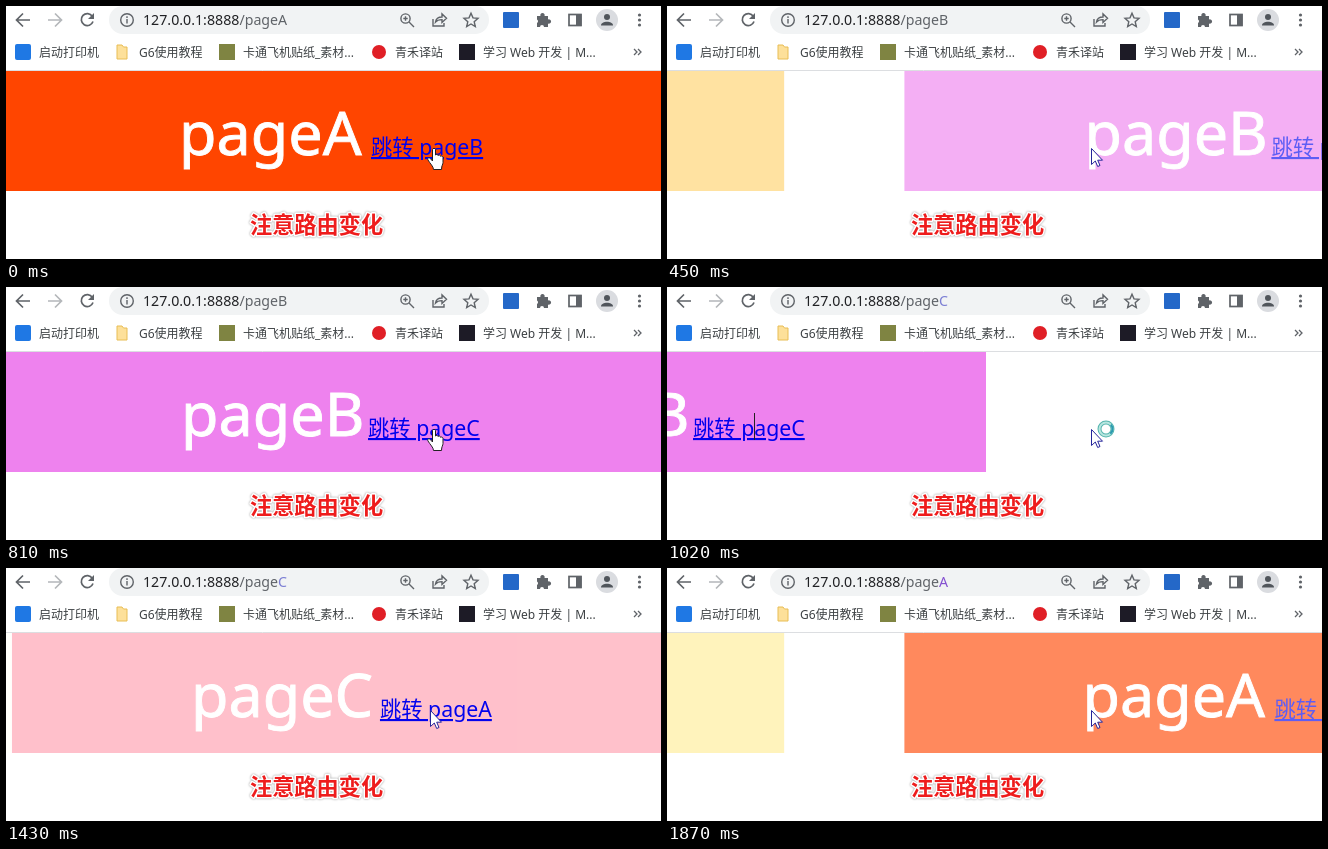
Recreate the animation shown at these times as an HTML page. Size 655 px wide and 253 px high, loop 1910 ms.

```html
<!DOCTYPE html>
<html lang="zh">
<head>
<meta charset="utf-8">
<title>Page transitions</title>
<style>
  html, body { margin: 0; width: 100%; height: 100%; overflow: hidden; background: #fff; }
  svg { display: block; font-family: "Noto Sans", "Noto Sans CJK SC", sans-serif; }
  .bar { font-size: 12px; fill: #3c4043; }
  .icon { fill: none; stroke: #5f6368; stroke-width: 1.7; }
  .title { font-size: 61px; fill: #fff; stroke: #fff; stroke-width: .9px; }
  .link { font-size: 21.3px; fill: #00e; text-decoration: underline; }
  .note { font: bold 22.2px "Noto Sans CJK SC", "Noto Sans CJK", sans-serif; fill: #ee1c1c;
    stroke: #fff; stroke-width: 3px; paint-order: stroke; stroke-linejoin: round;
    filter: drop-shadow(0 0 1px #999); }
</style>
</head>
<body>
<svg width="655" height="253" viewBox="0 0 655 253">
  <rect width="655" height="253" fill="#fff"/>
  <rect x="103" y="0" width="380" height="28" rx="14" fill="#f1f3f4"/>

  <!-- toolbar -->
  <g class="icon">
    <path d="M24 14H11M17 7.500L10.500 14L17 20.500"/>
    <path d="M42 14H55M49 7.500L55.500 14L49 20.500" stroke="#b4b7ba"/>
    <path d="M86.300 10.200A6 6 0 1 0 87 15.500"/>
    <path d="M88 7V13H82Z" fill="#5f6368" stroke="none"/>
    <g stroke-width="1.4">
      <circle cx="121" cy="14" r="6.300"/>
      <path d="M121 13V17.500M121 10.300V11.900"/>
      <circle cx="399.500" cy="12.500" r="4.600"/>
      <path d="M403 16L408 21M397.300 12.500H401.700M399.500 10.300V14.700"/>
      <path d="M427 13V20H438V17M429.500 16C430 12.500 432.500 11 436 11V8L440.500 12.300L436 16.500V13.600C433 13.600 431 14.200 429.500 16Z"/>
      <path d="M465 7.300L467 11.900L472 12.400L468.200 15.700L469.300 20.500L465 18L460.700 20.500L461.800 15.700L458 12.400L463 11.900Z"/>
    </g>
    <rect x="563" y="8.500" width="12" height="11"/>
  </g>
  <rect x="570" y="8" width="5.500" height="12" fill="#5f6368"/>
  <rect x="497" y="6" width="16" height="16" rx="1" fill="#2468c8"/>
  <path d="M531 10H534.500A2.200 2.200 0 1 1 538.500 10H542V13.500A2.200 2.200 0 1 1 542 17.500V21H538A2 2 0 0 0 534 21H531V17A2 2 0 0 0 531 13.500Z" fill="#5f6368"/>
  <circle cx="601" cy="14" r="11" fill="#dadce0"/>
  <circle cx="601" cy="11" r="3" fill="#50555b"/>
  <path d="M595 19.500C595 14.500 607 14.500 607 19.500Z" fill="#50555b"/>
  <g fill="#5f6368">
    <circle cx="633.500" cy="9" r="1.600"/><circle cx="633.500" cy="14" r="1.600"/><circle cx="633.500" cy="19" r="1.600"/>
  </g>
  <text x="137" y="18.500" font-size="14.200" fill="#202124">127.0.0.1:8888<tspan fill="#5f6368">/page</tspan><tspan id="route">A</tspan></text>

  <!-- bookmarks -->
  <rect x="9" y="38" width="16" height="16" rx="2" fill="#1f78e4"/>
  <path d="M111 39H116L117.500 41H121V53H111Z" fill="#fde09a" stroke="#e8bd55"/>
  <rect x="213" y="38" width="16" height="16" fill="#7f8442"/>
  <circle cx="373" cy="46" r="7" fill="#e01f26"/>
  <rect x="453" y="38" width="16" height="16" fill="#1d1b26"/>
  <g class="bar">
    <text x="33" y="51">启动打印机</text>
    <text x="133" y="51">G6使用教程</text>
    <text x="237" y="51">卡通飞机贴纸_素材...</text>
    <text x="389" y="51">青禾译站</text>
    <text x="477" y="51">学习 Web 开发 | M...</text>
  </g>
  <path class="icon" d="M628 43L631 46L628 49M632 43L635 46L632 49" style="stroke-width:1.300"/>
  <path d="M0 64.500H655" stroke="#dcdee1"/>

  <g id="pages"></g>
  <text class="note" x="244" y="226.500">注意路由变化</text>

  <!-- pointer -->
  <path id="arrow" d="M424.500 142.500V158.500L428.300 155L430.700 160.500L433 159.500L430.700 154.200H435.500Z" fill="#fff" stroke="#25259a"/>
  <path id="hand" d="M426.500 143.500C426.500 142 429.500 142 429.500 143.500V149C430 148 432 148.300 432 149.500C433 148.600 434.500 149 434.500 150.300C435.500 149.600 437 150.300 437 151.500V156.500C437 158.500 435.500 159.500 435.500 163.500H427.500C427.500 160.500 424 157.500 422 154C421 152 423 151 424.300 152.500L426.500 155Z" fill="#fff" stroke="#222"/>
  <g id="busy" fill="none">
    <circle cx="439" cy="142" r="6.500" stroke="#55b5ae" stroke-width="4"/>
    <circle cx="439" cy="142" r="6.500" stroke="#b8e6e0" stroke-width="2"/>
    <path id="spin" d="M439 135.500A6.500 6.500 0 0 1 445.500 142" stroke="#2b9ab0" stroke-width="2"/>
  </g>
</svg>
<script>
const LOOP = 1910, WIDTH = 660, REST = -5, HALF = 319;
const SLIDE = 485, WAIT = 24;
const YELLOW = [255, 240, 0];
const $ = id => document.getElementById(id);

const pages = [
  { name: "A", next: "B", color: [255, 69, 0], titleX: 178, linkX: 370 },
  { name: "B", next: "C", color: [238, 130, 238], titleX: 180, linkX: 367 },
  { name: "C", next: "A", color: [255, 192, 203], titleX: 179, linkX: 368 }
];
// start of each slide, and the colour of the route's last letter after it
const moves = [
  { start: 273, ink: "#5f6368" },
  { start: 1027, ink: "#7c7fd4" },
  { start: 1693, ink: "#8450d0" }
];

$("pages").innerHTML = pages.map(p => `<g>
  <rect y="65" width="${WIDTH}" height="120"/>
  <text class="title" x="${p.titleX}" y="149">page${p.name}</text>
  <text class="link" x="${p.linkX}" y="149">跳转 page${p.next}</text>
  <path d="M428.500 126V153" stroke="#222"/></g>`).join("");
const groups = [...$("pages").children];

// CSS "ease": cubic-bezier(.25, .1, .25, 1)
function ease(x) {
  if (x <= 0) return 0;
  if (x >= 1) return 1;
  const curve = (a, b, u) => 3 * a * u * (1 - u) ** 2 + 3 * b * u * u * (1 - u) + u ** 3;
  let lo = 0, hi = 1;
  for (let i = 0; i < 24; i++) {
    const mid = (lo + hi) / 2;
    if (curve(.25, .25, mid) < x) lo = mid; else hi = mid;
  }
  return curve(.1, 1, lo);
}

const mix = (a, b, p) => `rgb(${a.map((v, i) => Math.round(v + (b[i] - v) * p))})`;
const show = (el, on) => { el.style.display = on ? "" : "none"; };

function place(i, x, opacity, fill, caret) {
  const g = groups[i];
  show(g, opacity > 0);
  g.setAttribute("transform", `translate(${x} 0)`);
  g.setAttribute("opacity", opacity);
  g.children[0].setAttribute("fill", fill);
  show(g.children[3], caret);
}

function draw(t) {
  const done = moves.filter(m => t >= m.start - WAIT).length;
  const now = done % 3, old = done - 1;
  const move = moves[old];
  const age = move ? t - move.start : Infinity;
  const p = ease(age / SLIDE);

  pages.forEach((page, i) => {
    if (i === now) place(i, REST + WIDTH * (1 - p), p, mix(page.color, page.color, 0), false);
    else if (i === old) place(i, HALF * (1 - p) - WIDTH, 1 - p, mix(page.color, YELLOW, p), p < .05);
    else show(groups[i], false);
  });

  $("route").textContent = pages[now].name;
  $("route").setAttribute("fill", move ? move.ink : "#5f6368");

  const hand = age > SLIDE + 40;
  show($("hand"), hand);
  show($("arrow"), !hand);
  show($("busy"), age < 60);
  $("spin").setAttribute("transform", `rotate(${t * .4 % 360} 439 142)`);
}

const begin = performance.now();
function tick() {
  draw((performance.now() - begin) % LOOP);
  requestAnimationFrame(tick);
}
tick();
</script>
</body>
</html>
```
